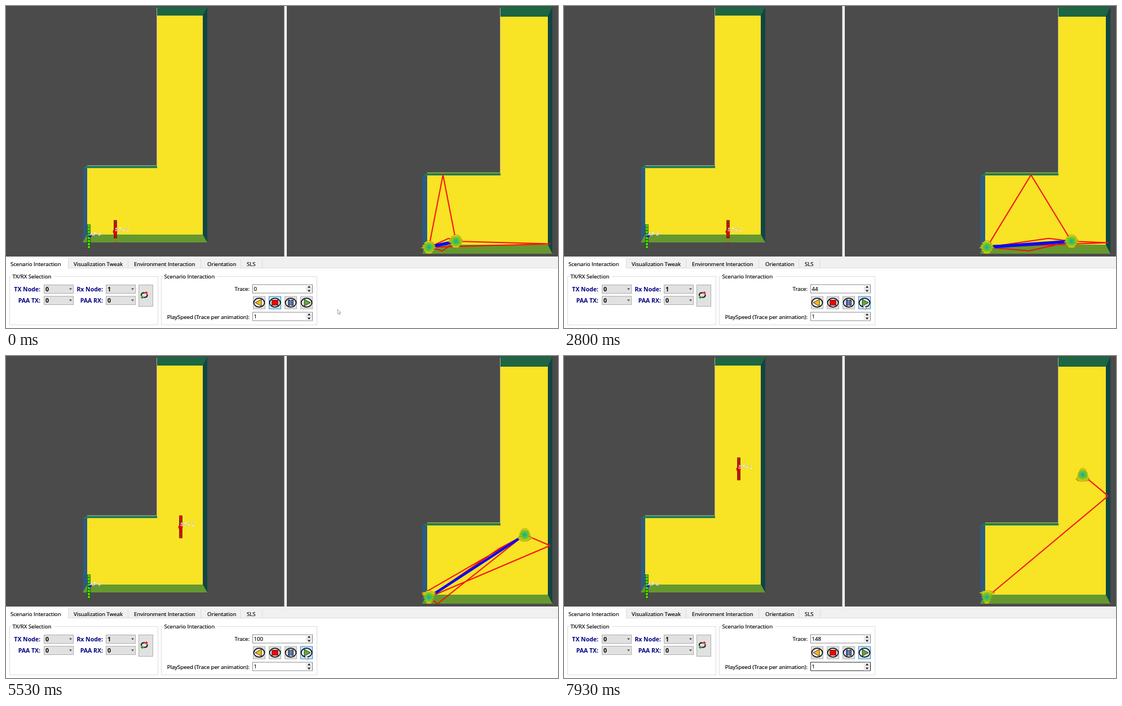
These frames come from a looping animation (979x572 px, 8000 ms). An HTML page:

```html
<!DOCTYPE html>
<html lang="en">
<head>
<meta charset="utf-8">
<title>Ray tracing scenario viewer</title>
<style>
  html, body { margin: 0; width: 100%; height: 100%; overflow: hidden; background: #fff; }
  svg { display: block; width: 979px; height: 572px; }
  text { font: 9.6px "Open Sans", "Noto Sans", sans-serif; fill: #000; stroke: #000; stroke-width: .22; }
  .bold { font-weight: 700; font-size: 10.5px; stroke: none; }
  .navy { fill: #000080; }
  .end { text-anchor: end; }
  .tag { font: italic bold 9.3px "Liberation Sans", sans-serif; fill: #fff; stroke: none;
         filter: drop-shadow(.8px .8px 0 #333); }
  .top { fill: #1e6543; } .side { fill: #0f4543; } .floor { fill: #f8e325; }
  .left { fill: #2c5a80; } .front { fill: #66982f; } .step { fill: #217f55; }
  .edge { fill: none; stroke: #b5b09a; }
  .box { fill: none; stroke: #dcdcdc; }
  .ctl { fill: #e1e1e1; stroke: #adadad; }
  .ctl.hot { fill: #cce6f8; stroke: #2a83c4; }
  .field { fill: #fff; stroke: #8a8a8a; }
  .rays { fill: none; stroke: #f80d0d; stroke-width: 2; stroke-linejoin: round; }
</style>
</head>
<body>
<svg viewBox="0 0 979 572">
  <defs>
    <radialGradient id="gain" gradientUnits="userSpaceOnUse" cx="0" cy="0" r="16">
      <stop offset="0" stop-color="#10a8e8"/><stop offset=".2" stop-color="#1fd890"/>
      <stop offset=".42" stop-color="#7fe020"/><stop offset=".62" stop-color="#e2e41c"/>
      <stop offset=".82" stop-color="#f2c41c"/><stop offset="1" stop-color="#e8661a"/>
    </radialGradient>
    <clipPath id="aboveWall"><path d="M0 0H493V413H0Z"/></clipPath>
  </defs>

  <path fill="#4b4b4b" d="M0 0H979V445H0Z"/>
  <path fill="#f0f0f0" d="M493.5 0H498V445H493.5Z"/>

  <g>
    <path class="top" d="M267 2H357L349 17H268Z"/>
    <path class="side" d="M357 2V420L349 406V17Z"/>
    <path class="floor" d="M268 17H349V406H144V288H268Z"/>
    <path class="left" d="M137 288L144 284V406L136.500 420Z"/>
    <path class="front" d="M144 406H349L357 420H136Z"/>
    <path class="step" d="M137 288L143 284H268V288Z"/>
    <path class="edge" d="M144 283.500H267.500V3"/>
  </g>
  <g>
    <path class="top" d="M875 1H969L961 19H877Z"/>
    <path class="side" d="M969 1V440L961 424V19Z"/>
    <path class="floor" d="M877 19H961V424H747V301H877Z"/>
    <path class="left" d="M738 302L747 297V424L738.500 440Z"/>
    <path class="front" d="M747 424H961L969 440H738Z"/>
    <path class="step" d="M739 301L747 297H877V301Z"/>
    <path class="edge" d="M876.500 297V3"/>
    <path fill="none" stroke="#e2cf2c" d="M747 296.300H876"/>
  </g>

  <g id="ap"></g>
  <text class="tag" x="148" y="408">AP 0</text>
  <g clip-path="url(#aboveWall)"><g id="sta"></g></g>
  <path id="staFoot" stroke="#e00000" stroke-width="1.500"/>
  <text class="tag" id="staTag">STA 1</text>

  <path id="reflections" class="rays"/>
  <path id="direct" stroke="#0a0af5"/>
  <g id="apGain"></g>
  <g id="staGain"></g>

  <path fill="#fff" d="M0 445H979V572H0Z"/>
  <path fill="#f0f0f0" d="M0 445H979V466H0Z"/>
  <path fill="none" stroke="#dcdcdc" d="M110 465.500H979M110.500 449V466M216.500 450V466M345.500 450V466M416.500 450V466M454.500 450V466"/>
  <path fill="#fff" d="M0 448H110V467H0Z"/>
  <g id="panel"></g>
  <path id="cursor" fill="#fff" stroke="#777" stroke-width=".7" d="M0 0V8L2 6.300L3.400 9.300L4.700 8.700L3.400 5.800H5.800Z"/>
</svg>

<script>
const $ = id => document.getElementById(id);
const LOOP = 8000, FRAME = 1000 / 15;

// ---- control panel ----
const label = (x, y, s, cls = '') => `<text x="${x}" y="${y}" class="${cls}">${s}</text>`;
const rect = (x, y, w, h, cls, id = '') =>
  `<rect id="${id}" class="${cls}" x="${x + .5}" y="${y + .5}" width="${w}" height="${h}"/>`;
const combo = (x, y, s) => rect(x, y, 52, 15, 'ctl') + label(x + 3, y + 11.500, s, 'bold') +
  `<path d="M${x + 45} ${y + 6.500}h5l-2.500 3z" fill="#444"/>`;
const group = (x, w, title, gap) => rect(x, 480, w, 86, 'box') +
  `<path fill="#fff" d="M${x + 4} 478h${gap}v5h-${gap}z"/>` + label(x + 5.500, 484, title);
const spin = (y, id) => rect(437, y, 106, 15, 'field', id + 'Box') +
  rect(532, y + 1, 10, 6, 'box') + rect(532, y + 8, 10, 6, 'box') +
  `<path d="M534.500 ${y + 6}h6l-3-3.500zM534.500 ${y + 10}h6l-3 3.500z" fill="#222"/>` +
  `<text id="${id}" x="439.500" y="${y + 11.500}">1</text>`;
const button = (x, id, icon) => rect(x - 11, 515.500, 21, 22, 'ctl', id) +
  `<g transform="translate(${x} 527)" stroke="#111"><ellipse rx="9.500" ry="7.800" fill="#eee" stroke-width="1.700"/>${icon}</g>`;

$('panel').innerHTML = [
  label(8, 461.500, 'Scenario Interaction'), label(120, 462, 'Visualization Tweak'),
  label(227, 462, 'Environment Interaction'), label(357, 462, 'Orientation'), label(427, 462, 'SLS'),
  group(6, 263, 'TX/RX Selection', 76), group(275, 276, 'Scenario Interaction', 96),
  label(61, 506.500, 'TX Node:', 'bold navy end'), label(172, 506.500, 'Rx Node:', 'bold navy end'),
  label(61, 526.500, 'PAA TX:', 'bold navy end'), label(172, 526.500, 'PAA RX:', 'bold navy end'),
  combo(67, 495, 0), combo(177, 495, 1), combo(67, 515, 0), combo(177, 515, 0),
  rect(235, 495, 25, 38, 'ctl'),
  `<g fill="none" stroke-width="2.200"><path d="M240 515q-1-6 6-5.500" stroke="#222"/><path d="M245 509.500h4" stroke="#d22"/>
   <path d="M250.500 512q1 6-5.500 5.500" stroke="#222"/><path d="M245 517.500h-4" stroke="#2a8a2a"/></g>
   <path d="M248 506.500l4 3-4 3z" fill="#d22"/><path d="M242.500 514.500l-4 3 4 3z" fill="#2a8a2a"/>`,
  label(432, 506, 'Trace:', 'end'), label(432, 556, 'PlaySpeed (Trace per animation):', 'end'),
  spin(494.500, 'trace'), spin(543.500, 'speed'),
  button(449, 'back', '<path d="M-7 0L4-6V6Z" fill="#fdbb0a" stroke-width=".8"/>'),
  button(477, 'stop', '<path d="M-5.500-4.500h11v9h-11z" fill="#f00" stroke-width=".8"/>'),
  button(505, 'pause', '<path d="M-4.500-5h3.500v10h-3.500zM1-5h3.500v10H1z" fill="#4a72c0" stroke-width=".8"/>'),
  button(533, 'play', '<path d="M7 0L-4-6V6Z" fill="#5fa83c" stroke-width=".8"/>')
].join('');

// ---- antenna columns, drawn around their centre ----
const column = (color, cell) => Array.from({ length: 8 }, (_, i) =>
  `<rect x="-2.500" y="${(i - 4) * cell + .3}" width="5" height="${cell - .6}" fill="${color}" stroke="#1a1a00" stroke-width=".6"/>`).join('');
$('ap').setAttribute('transform', 'translate(147 409.500)');
$('ap').innerHTML = column('#3fe010', 5.350) + '<circle r="2.500" cy="-1" cx="2" fill="#1010e0"/>';
$('sta').innerHTML = column('#ee0808', 5) + '<circle r="3.900" cx="-.5" cy=".5" fill="#dc0606"/>';

// ---- motion: time, trace number, distance walked ----
const keys = [[467, 0, 0], [1467, 19, 42], [2800, 44, 97], [4467, 78, 169],
              [5533, 100, 213], [6467, 119, 256], [7933, 148, 316]];
const CORNER = 116;
const clamp = x => Math.max(0, Math.min(1, x));
const mix = (a, b, p) => a + (b - a) * p;

function walk(t) {
  let i = 0;
  while (i < keys.length - 2 && t > keys[i + 1][0]) i++;
  const [a, b] = [keys[i], keys[i + 1]];
  const p = clamp((t - a[0]) / (b[0] - a[0]));
  return { trace: Math.round(mix(a[1], b[1], p)), dist: mix(a[2], b[2], p) };
}

// Stack of rings, widest where the main lobe points (tilt -1..1, downwards positive).
function gainPattern(id, x, y, tilt) {
  const lobe = 13 * tilt, lean = Math.abs(tilt);
  let rings = '';
  for (let i = 0; i < 10; i++) {
    const h = 9.900 - 2.200 * i, away = Math.abs(h - lobe);
    const body = (i % 2 ? 9.500 : 11.500) * Math.sqrt(1 - (h / 12) ** 2) * (1 - .03 * away * lean);
    const w = Math.max(2.500, body + 4.500 * Math.exp(-((away / 2.500) ** 2)) * (.6 + lean));
    rings += `<ellipse cy="${h}" rx="${w}" ry="1.700"/>`;
  }
  $(id).innerHTML = `<g transform="translate(${x} ${y})" fill="url(#gain)" stroke="#6b6a08" stroke-width=".5">${rings}</g>`;
}

const AP = [750, 428.5], WALL = { top: 300, left: 738, right: 965, cornerX: 877, cornerY: 297 };
const clearsCorner = ([ax, ay], [bx, by]) => bx <= WALL.cornerX ||
  mix(ay, by, (WALL.cornerX - ax) / (bx - ax)) > WALL.cornerY;

function drawRays(sta, rise) {
  const [ax, ay] = AP, [sx, sy] = sta;
  const paths = [];
  const via = point => paths.push(`M${AP}L${point}L${sta}`);

  const topX = mix(ax, sx, (ay - WALL.top) / (ay + sy - 2 * WALL.top));
  if (sy > WALL.top && topX < WALL.cornerX) via([topX, WALL.top]);

  const share = 11 / (22 + rise);
  const bottom = [mix(ax, sx, share), 441.500 - 13 * share];
  if (clearsCorner(bottom, sta)) via(bottom);

  const reach = WALL.right - ax;
  const rightY = mix(ay, sy, reach / (reach + WALL.right - sx));
  via([WALL.right, rightY]);

  const left = [WALL.left, mix(ay, sy, .05)];
  if (clearsCorner(left, sta)) via(left);

  const seen = clearsCorner(AP, sta);
  if (seen) {
    const groundY = mix(ay, sy, .73);
    via([mix(ax, sx, .73), groundY - (groundY - 210) * .038]);
  }
  $('reflections').setAttribute('d', paths.join(''));
  $('direct').setAttribute('d', seen ? `M${AP}L${sta}` : '');
  $('direct').setAttribute('stroke-width', 5.600 - rise / 100);
  return seen ? rise / Math.hypot(sx - ax, rise) : (ay - rightY) / Math.hypot(reach, ay - rightY);
}

function draw(t) {
  const { trace, dist } = walk(t);
  const across = Math.min(dist, CORNER), up = Math.max(0, dist - CORNER);

  const x = 194 + across, y = 400.500 - up;
  $('sta').setAttribute('transform', `translate(${x} ${y})`);
  $('staFoot').setAttribute('d', y > 399 ? `M${x - 2} 420.500h4` : '');
  $('staTag').setAttribute('x', x - 1);
  $('staTag').setAttribute('y', y - 1);

  const rise = up * 1.035;
  const sta = [798 + across * 1.052, 418 - rise];
  const tilt = drawRays(sta, rise);
  gainPattern('apGain', ...AP, -tilt);
  gainPattern('staGain', ...sta, tilt);

  const arrive = clamp(t / 266), leave = clamp((t - 7600) / 330);
  $('cursor').setAttribute('transform',
    `translate(${mix(588, 531, arrive) - 6 * leave} ${mix(539, 531, arrive) + 45 * leave})`);
  $('play').classList.toggle('hot', arrive > .95);
  $('stop').classList.toggle('hot', t < 466);
  $('speedBox').style.stroke = leave > .6 ? '#222' : '';
  $('trace').textContent = trace;
}

function tick() {
  const t = performance.now() % LOOP;
  draw(Math.floor(t / FRAME + .05) * FRAME);
  requestAnimationFrame(tick);
}
tick();
</script>
</body>
</html>
```
